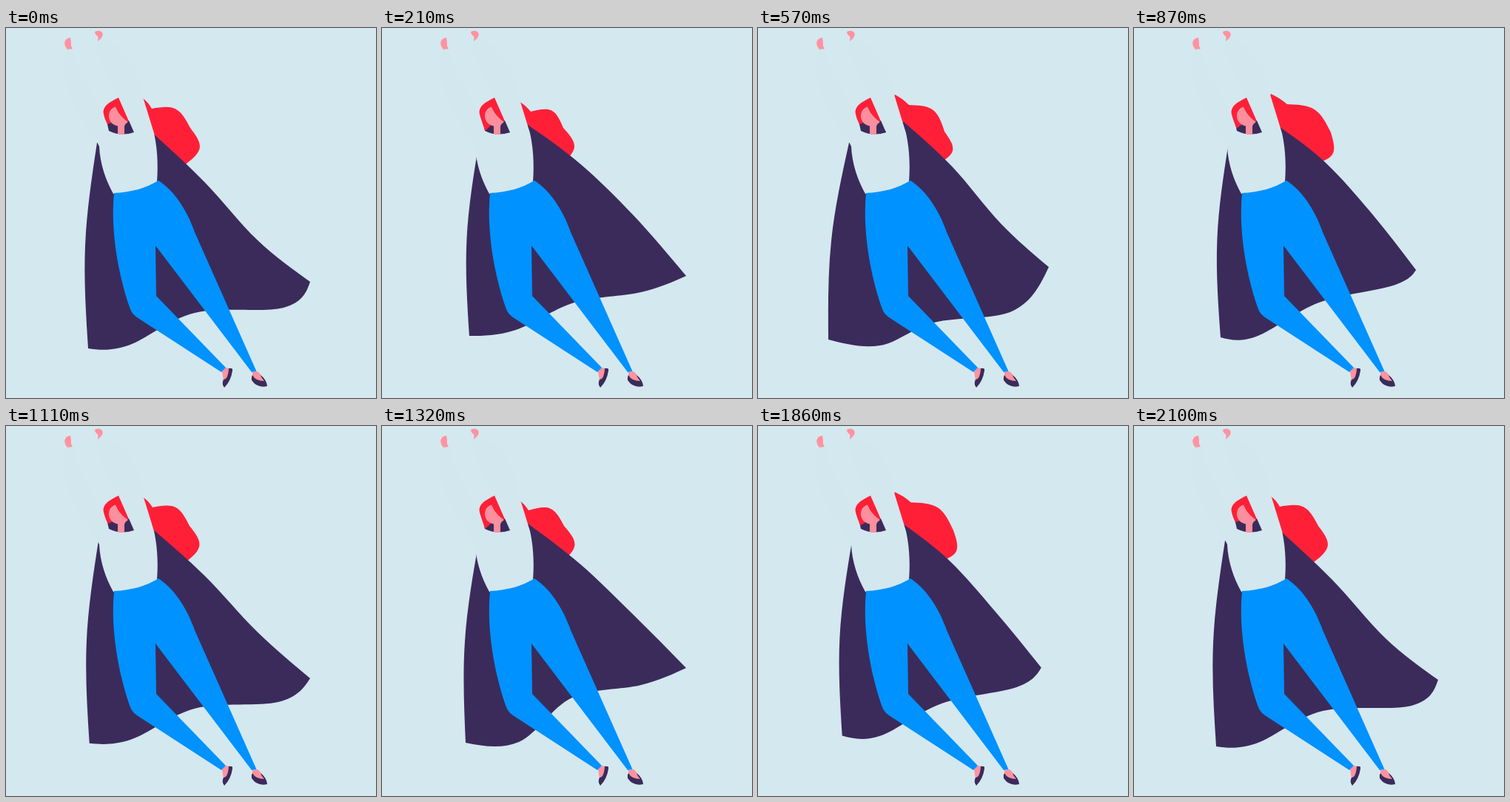
These frames come from a looping animation (500x500 px, 2.16 s). An HTML page:

```html
<!DOCTYPE html>
<html lang="en">
<head>
<meta charset="utf-8">
<title>Flying heroine</title>
<style>
  html, body { margin: 0; width: 100%; height: 100%; overflow: hidden; background: #d4e8ef; }
  svg { display: block; width: 100vw; height: 100vh; }
  .shirt { fill: #d3e7ef; }
  .dark { fill: #3b2b5b; }
  .skin { fill: #ff929f; }
  .face { fill: #fa8f9e; }
  .jeans { fill: #0092ff; }
  .hair { fill: #ff2038; }
</style>
</head>
<body>
<svg viewBox="0 0 500 500">
  <path class="hair" id="locks"/>
  <path class="dark" id="cape"/>

  <!-- torso and raised arms -->
  <path class="shirt" d="M80 28 C72 70 92 115 122 152 L126 160 C127 184 135 206 145 224 L180 232 L204 208 C206 182 204 160 200 142
    L184 90 C180 60 168 30 131 14 L121 18 C126 50 140 75 151 92 L173 141 Q155 146 139 139 L130 112 C108 80 96 55 90 28 Z"/>

  <!-- head -->
  <path class="dark" d="M136.5 128 L145 124 L166 125 L173 141 Q155 147 139 139 Z"/>
  <path class="hair" id="crown"/>
  <path class="face" d="M148 106.5 C151 114 156 121 165 127 Q161 129 160 133 V143.5 Q155 144.5 151 143.5 V132.5
    C143 131 139 125 139 119 C139 112 143 108 148 106.5 Z"/>

  <!-- hands -->
  <path class="skin" d="M87 13 Q80 14 79 20 Q80 26 83 29 L90 28 Q87 24 88 19 Z"/>
  <path class="skin" d="M120 5 Q126 2 130 6 Q133 11 124 18 Q125 14 124 11 Q120 9 120 5 Z"/>

  <!-- feet -->
  <path class="skin" d="M292 464 L297 459 L302 460 Q302 470 294 477 Z"/>
  <path class="dark" d="M301 460 Q307 459 306 463 Q304 477 295 486 Q291 481 294 475 Q300 475 301 460 Z"/>
  <path class="skin" d="M333 465 L340 464 Q347 470 350 478 Q338 480 333 472 Z"/>
  <path class="dark" d="M333 469 Q337 477 349 477 Q345 473 344 469 Q352 475 353 484 Q339 487 332 476 Q331 472 333 469 Z"/>

  <path class="jeans" d="M146 223 C170 222 190 216 206 206 C230 222 246 250 255 276 L338.5 464 L332 465 L202 294 L203 362
    L297 459 L291 465 L180 393 Q171 388 168 380 C152 335 141 275 146 223 Z"/>
</svg>

<script>
  const LOOP = 2160, SWINGS_END = 2100, SWING = 1050;

  // Key poses of one swing. sag: vertical offsets of the long edge at its thirds.
  const poses = [
    { at: 0, shoulder: 141, sag: [0, 11], tip: [411, 343], hem: [[375, 378], [255, 385], [165, 429]],
      corner: [111, 433], lift: 0, notch: [197, 109], kink: [249, 135] },
    { at: 210, shoulder: 131, sag: [-15, -14], tip: [411, 335], hem: [[350, 357], [260, 371], [180, 408]],
      corner: [118, 416], lift: 1, notch: [201, 113], kink: [245, 135] },
    { at: 270, shoulder: 132, sag: [-10, -7], tip: [411, 327], hem: [[350, 350], [257, 367], [185, 427]],
      corner: [113, 428], lift: 1, notch: [198, 114], kink: [246, 135] },
    { at: 570, shoulder: 127, sag: [-5, 6], tip: [393, 323], hem: [[345, 382], [238, 398], [165, 429]],
      corner: [95, 421], lift: 0, notch: [204, 104], kink: [252, 140] },
    { at: 870, shoulder: 134, sag: [-17, -14], tip: [381, 327], hem: [[350, 348], [250, 371], [165, 417]],
      corner: [117, 418], lift: 0.6, notch: [207, 103], kink: [266, 141] }
  ];
  poses.push({ ...poses[0], at: SWING });

  // Blends numbers, arrays and objects alike.
  function mix(a, b, u) {
    if (typeof a === "number") return a + (b - a) * u;
    if (Array.isArray(a)) return a.map((v, i) => mix(v, b[i], u));
    return Object.fromEntries(Object.keys(a).map(k => [k, mix(a[k], b[k], u)]));
  }

  const ease = u => (u + u * u * (3 - 2 * u)) / 2;

  function poseAt(time) {
    const t = Math.min(time % LOOP, SWINGS_END) % SWING;
    const next = poses.findIndex(p => p.at > t);
    const a = poses[next - 1], b = poses[next];
    return mix(a, b, ease((t - a.at) / (b.at - a.at)));
  }

  // Smooth cubic segments through the points, starting at the first one.
  function spline(pts) {
    const last = pts.length - 1;
    const inner = i => [0, 1].map(k => (pts[i + 1][k] - pts[i - 1][k]) / 2);
    const end = (i, j, m) => [0, 1].map(k => 1.5 * (pts[j][k] - pts[i][k]) - m[k] / 2);
    const slope = i =>
      i === 0 ? end(0, 1, inner(1)) :
      i === last ? end(last - 1, last, inner(last - 1)) : inner(i);
    return pts.slice(1).map((p, i) => {
      const from = pts[i], m0 = slope(i), m1 = slope(i + 1);
      return "C" + [from[0] + m0[0] / 3, from[1] + m0[1] / 3, p[0] - m1[0] / 3, p[1] - m1[1] / 3, ...p];
    }).join("");
  }

  // An arc from a to b whose middle stands off the chord by size.
  function arc(a, b, size) {
    const dx = b[0] - a[0], dy = b[1] - a[1], len = Math.hypot(dx, dy);
    const mid = [(a[0] + b[0]) / 2 + dy / len * size, (a[1] + b[1]) / 2 - dx / len * size];
    return spline([a, mid, b]);
  }

  function capePath({ shoulder, sag, tip, hem, corner, lift }) {
    const top = [197, shoulder];
    const third = i => {
      const [x, y] = mix(top, tip, (i + 1) / 3);
      return [x, y + sag[i]];
    };
    return "M" + top + spline([top, third(0), third(1), tip]) + spline([tip, ...hem, corner]) +
      arc(corner, [123 + 8 * lift, 155], 10) + "L150 150Z";
  }

  function locksPath({ notch, kink }) {
    const root = [185, notch[1] - 14];
    return "M" + root + arc(root, notch, 1) + arc(notch, kink, 14) + arc(kink, [243, 184], 16) + "L199 150L180 100Z";
  }

  function crownPath({ lift }) {
    const tip = [137 + 2.5 * lift, 130 + 9 * lift];
    return "M152 94C143 99 132 103 131.500 114" + spline([[131.5, 114], [133.5, 122], tip]) +
      `L148 ${126 + 5 * lift}L166 126Z`;
  }

  const shapes = { cape: capePath, locks: locksPath, crown: crownPath };

  function draw(now) {
    const pose = poseAt(now);
    for (const id in shapes) document.getElementById(id).setAttribute("d", shapes[id](pose));
    requestAnimationFrame(draw);
  }
  draw(performance.now());
</script>
</body>
</html>
```
